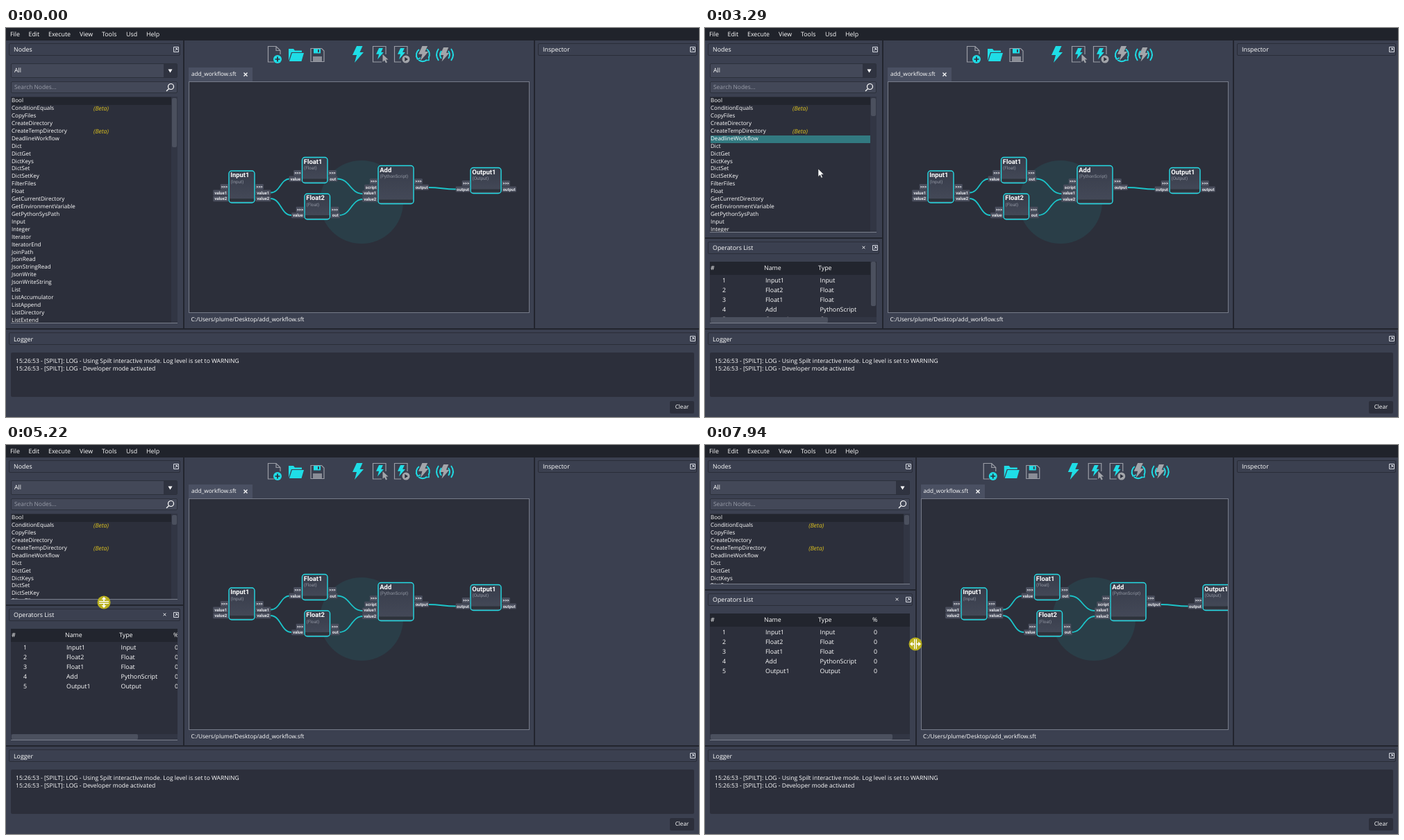
Animation, 998 px wide and 561 px high, one loop 8 s. Source, as an HTML page:

```html
<!DOCTYPE html>
<html lang="en">
<head>
<meta charset="utf-8">
<title>Node editor</title>
<style>
/* --split: centre of the lower left title; --wide: growth of the left column */
@property --split { syntax: '<number>'; inherits: true; initial-value: 449; }
@property --wide { syntax: '<number>'; inherits: true; initial-value: 0; }

html, body { margin: 0; width: 100%; height: 100%; overflow: hidden; background: #3b4050; }
#stage {
  --d: calc(var(--wide) * 1px);
  --t: calc(var(--split) * 1px);
  position: relative; width: 998px; height: 561px; overflow: hidden;
  background: #3b4050; color: #fff; white-space: pre;
  font: 8.85px 'Open Sans', 'Noto Sans', sans-serif;
  text-rendering: geometricPrecision;
  animation: split 8s step-end infinite, widen 8s step-end infinite;
}
#stage div, #stage span, #stage svg { position: absolute; box-sizing: border-box; }
svg { overflow: visible; }

.line { background: #22252e; }
.dark { background: #2c2f3b; }
.title { height: 18px; line-height: 17px; padding-left: 6px; border: 1px solid #2a2d38; border-radius: 2px; }
.title svg { right: 1px; top: 4px; }
.field { left: 7px; right: 8px; background: #434858; border: 1px solid #2c303b; border-radius: 2px; padding-left: 4px; }
.well { background: #2c2f3b; border-radius: 2px; }
.thumb { background: #4b505e; border-radius: 2px; }

#menu { left: 0; top: 0; width: 998px; height: 18px; background: #20232b; line-height: 18px; }
#toolsHi { left: 132px; top: 0; width: 34px; height: 17px; background: #37808a; border-radius: 2px; animation: toolsHi 8s step-end infinite; }
#drop { left: 132px; top: 18px; width: 77px; height: 20px; background: #2c2f3b; border: 1px solid #4b505e; animation: drop 8s step-end infinite; }
#drop span { inset: 0; padding-left: 9px; line-height: 18px; animation: dropHi 8s step-end infinite; }

#left { left: 0; top: 18px; width: calc(255px + var(--d)); height: 415px; overflow: hidden; }
#left > div { margin-top: -18px; }
#list { left: 7px; right: 8px; top: 99px; height: calc(var(--t) - 122.5px); overflow: hidden; border-bottom: 1px solid #7a7f8c; font-size: 8.05px; line-height: 10.91px; }
#list .row { left: 1px; right: 9px; height: 10.91px; }
#list .row i { position: absolute; left: calc(118px + var(--d) * .49); color: #dcc11f; font-size: 8.6px; }
#list .thumb { --h: calc(var(--split) - 122); right: 1px; width: 7px; top: 2px; height: calc(max(14, var(--h) * var(--h) / 1506) * 1px); }
#hover { background: #327980; animation: hover 8s step-end infinite; }

#table {
  --v: clamp(0, var(--split) - 309, 1);
  --vw: calc(240 + var(--wide) - 9 * var(--v));
  left: 7px; right: 8px; top: calc(var(--t) + 19px); height: calc(407px - var(--t)); overflow: hidden;
  border-bottom: 1px solid #7a7f8c;
}
#cells { left: 0; top: 0; height: 100%; width: calc(var(--vw) * 1px); overflow: hidden; }
#cells .head { left: 0; right: 0; top: 0; height: 19px; background: #22252e; line-height: 19px; }
#cells .row { left: 0; top: 0; line-height: 14px; }
#hbar { left: 1px; bottom: 0; height: 8px; width: calc(var(--vw) * var(--vw) / 316 * 1px); }
#vbar { right: 1px; top: 0; width: calc(7px * var(--v)); height: calc(700px - 2 * var(--t)); }

#canvas { left: calc(263px + var(--d)); top: 77px; width: calc(491px - var(--d)); height: 334px; overflow: hidden; background: #2c2f3a; border: 1px solid #767b89; }
#graph { left: -264px; top: -78px; font-family: Roboto, sans-serif; }
#tools { left: 0; top: 0; transform: translateX(calc(var(--d) * .5)); }

#mouse { left: 0; top: 0; animation: move 8s step-end infinite; }
#arrow { animation: arrow 8s step-end infinite; }
#grip { animation: grip 8s step-end infinite; }
#press { animation: press 8s step-end infinite; }

@keyframes split {
  0% { --split: 449; }
  35.3% { --split: 318; }
  61.8% { --split: 300; animation-timing-function: steps(4); }
  65.1% { --split: 246; animation-timing-function: steps(6); }
  70%, 100% { --split: 224; }
}
@keyframes widen {
  0% { --wide: 0; }
  93.3% { --wide: 3; animation-timing-function: steps(6); }
  99.1%, 100% { --wide: 47.5; }
}
@keyframes toolsHi { 0% { opacity: 0; } 15.8% { opacity: 1; } 34.4%, 100% { opacity: 0; } }
@keyframes drop { 0% { opacity: 0; } 18.4% { opacity: 1; } 34.4%, 100% { opacity: 0; } }
@keyframes dropHi { 0% { background: #2c2f3b; } 21.1%, 100% { background: #37808a; } }
@keyframes hover {
  0% { opacity: 0; top: 12.2px; }
  40.3% { opacity: 1; top: 12.2px; }
  41% { opacity: 1; top: 55.9px; }
  41.9% { opacity: 1; top: 110.4px; }
  42.7% { opacity: 1; top: 154.1px; }
  43.5% { opacity: 1; top: 175.9px; }
  44.3% { opacity: 1; top: 186.8px; }
  47.8%, 100% { opacity: 0; top: 186.8px; }
}
@keyframes move {
  0% { transform: translate(925px, 539px); }
  5.7% { transform: translate(925px, 539px); animation-timing-function: steps(5); }
  9.7% { transform: translate(470px, 200px); animation-timing-function: steps(6); }
  14.9% { transform: translate(165px, 20px); }
  15.8% { transform: translate(159px, 16px); }
  16.6% { transform: translate(155px, 13px); }
  19.5% { transform: translate(155px, 13px); animation-timing-function: steps(3); }
  21.9% { transform: translate(168px, 29px); }
  26.2% { transform: translate(180px, 28px); animation-timing-function: steps(2); }
  27.8% { transform: translate(203px, 27px); }
  39.4% { transform: translate(192px, 62px); animation-timing-function: steps(2); }
  41% { transform: translate(163px, 203px); animation-timing-function: steps(4); }
  44.3% { transform: translate(142px, 290px); }
  46% { transform: translate(142px, 291px); animation-timing-function: steps(5); }
  51% { transform: translate(138px, 300px); }
  54.4% { transform: translate(138px, 302px); }
  61.8% { transform: translate(138px, 284px); animation-timing-function: steps(4); }
  65.1% { transform: translate(141px, 227px); animation-timing-function: steps(6); }
  70% { transform: translate(141px, 207px); }
  70.9% { transform: translate(160px, 215px); animation-timing-function: steps(3); }
  73.3% { transform: translate(261px, 264px); }
  76.5% { transform: translate(260px, 272px); animation-timing-function: steps(4); }
  80.6% { transform: translate(254px, 286px); }
  90.8% { transform: translate(255px, 287px); }
  93.3% { transform: translate(258px, 287px); animation-timing-function: steps(6); }
  99.1%, 100% { transform: translate(303px, 287px); }
}
@keyframes arrow { 0% { opacity: 0; } 5.7% { opacity: 1; } 54.4% { opacity: 0; } 70.9% { opacity: 1; } 90.8%, 100% { opacity: 0; } }
@keyframes grip {
  0% { opacity: 0; transform: none; }
  54.4% { opacity: 1; transform: none; }
  70.9% { opacity: 0; transform: rotate(90deg); }
  90.8%, 100% { opacity: 1; transform: rotate(90deg); }
}
@keyframes press {
  0% { opacity: 0; } 17.5% { opacity: 1; } 19.5% { opacity: 0; }
  34.4% { opacity: 1; } 35.3% { opacity: 0; } 56% { opacity: 1; }
  70.9% { opacity: 0; } 90.8%, 100% { opacity: 1; }
}
</style>
</head>
<body>
<div id="stage">
  <div id="left">
    <div class="title" style="left:4px;right:4px;top:22px">Nodes<svg width="8" height="8"><use href="#pop"/></svg></div>
    <div class="field" style="top:51px;height:21px;line-height:19px">All<div style="right:0;top:0;width:19px;height:19px;background:#2f3340"><svg width="19" height="19"><path d="M6.5 7.5h6l-3 5z" fill="#fff"/></svg></div></div>
    <div class="field" style="top:77px;height:17px;line-height:15px;color:#9a9eaa;font-size:8.4px">Search Nodes...<svg style="right:3px;top:1px" width="13" height="13" fill="none" stroke="#fff" stroke-width="1.2"><circle cx="7.5" cy="5.5" r="4"/><path d="M4.6 8.5L1 12"/></svg></div>
    <div id="list" class="dark"><div style="right:0;top:0;width:9px;height:100%;background:#323644"></div><div class="thumb"></div></div>
    <div class="line" style="left:0;right:0;top:calc(var(--t) - 16px);height:2px"></div>
    <div class="title" style="left:4px;right:4px;top:calc(var(--t) - 10px)">Operators List<svg width="8" height="8"><use href="#pop"/></svg><svg style="right:19px;top:5px" width="5" height="5"><path d="M.7.7l3.6 3.6M4.3.7L.7 4.3" stroke="#fff"/></svg></div>
    <div id="table" class="dark">
      <div id="cells"></div>
      <div id="vbar" class="thumb"></div>
      <div style="left:0;right:0;bottom:0;height:8px;background:#323644"></div>
      <div id="hbar" class="thumb"></div>
    </div>
  </div>
  <div class="line" style="left:calc(255px + var(--d));top:18px;width:2px;height:415px"></div>

  <svg id="tools" width="998" height="60">
    <defs>
      <path id="bolt" d="M6 0H14.5L10.5 9H16L3 24L6 13H0Z"/>
      <g id="pop" fill="none" stroke="#d5d8e0"><path d="M.5.5h7v7h-7z"/><path d="M2.3 5.7L5.5 2.5M3 2.5h2.5V5"/></g>
    </defs>
    <g fill="none" stroke="#9a9da6" stroke-width="1.2">
      <path d="M386 49H377.500V26.500H389L395 32.500V38M389 26.500V32.500H395"/>
      <path d="M439 29.500H454.500L458 33V48.500H439Z"/>
      <path d="M541 49H528.500V26.500H547V38M569 49H559.500V26.500H578V38"/>
    </g>
    <path d="M442 41H455V48H442Z" fill="#8a8d96"/>
    <g fill="#1fdde6">
      <circle cx="391" cy="45" r="6"/>
      <path d="M407 47V30H414L416 32.500H426V35H411Z"/>
      <path d="M408 48L412 36H429L425.500 48Z"/>
      <path d="M443 30H453V36.500H443Z"/>
      <use href="#bolt" x="499" y="26"/>
      <use href="#bolt" transform="translate(533 29) scale(.68)"/>
      <use href="#bolt" transform="translate(564 29) scale(.68)"/>
    </g>
    <path d="M391 41.500V48.500M387.500 45H394.500" stroke="#2c2f3b" stroke-width="1.700"/>
    <path d="M450 31V35" stroke="#3b4050" stroke-width="2"/>
    <g fill="#a3a5aa">
      <path d="M542.500 38V49L545 46.500L547 50.500L549 49.500L547 45.500H550.500Z"/>
      <circle cx="576" cy="45" r="5.500"/>
      <use href="#bolt" transform="translate(594 26) scale(.9)"/>
      <use href="#bolt" transform="translate(625 28) scale(.85)"/>
    </g>
    <path d="M574.300 42L579 45L574.300 48Z" fill="#2c2f3b"/>
    <g fill="none" stroke="#1fdde6" stroke-width="2">
      <path d="M592.500 44A9.500 9.500 0 0 1 595 31M606 30.500A9.500 9.500 0 0 1 608.500 43M606 46A9.500 9.500 0 0 1 594 46"/>
      <path d="M590.500 40L592.500 45L597 43M604 46.500H609V41.500" stroke-width="1.500"/>
      <path d="M627 33Q623 38.500 627 44M623 30Q617 38.500 623 47M637 33Q641 38.500 637 44M641 30Q647 38.500 641 47" stroke-width="1.800"/>
    </g>
  </svg>

  <div style="left:calc(263px + var(--d));top:57px;width:92px;height:20px;background:#4a5062;line-height:20px;padding-left:4px;font-size:8.2px">add_workflow.sft<svg style="left:79px;top:7px" width="6" height="6"><path d="M.5.5l5 5M5.5.5l-5 5" stroke="#fff" stroke-width="1.3"/></svg></div>
  <div id="canvas"><svg id="graph" width="998" height="561">
    <linearGradient id="body" x2="0" y2="1"><stop stop-color="#373c4a"/><stop offset="1" stop-color="#454a59"/></linearGradient>
    <circle cx="512" cy="251" r="60" fill="#2a3e48"/>
  </svg></div>
  <div style="left:calc(266.5px + var(--d));top:414px;line-height:14px;font-size:8.25px">C:/Users/plume/Desktop/add_workflow.sft</div>

  <div class="line" style="left:760px;top:18px;width:2px;height:415px"></div>
  <div class="title" style="left:766px;top:22px;width:229px">Inspector<svg width="8" height="8"><use href="#pop"/></svg></div>
  <div class="line" style="left:0;top:433px;width:998px;height:2px"></div>
  <div class="title" style="left:4px;top:439px;width:991px;line-height:18px">Logger<svg width="8" height="8"><use href="#pop"/></svg></div>
  <div class="well" style="left:7px;top:468px;width:984px;height:64px;padding:7px;line-height:11px;font-size:8.55px">15:26:53 - [SPILT]: LOG - Using Spilt interactive mode. Log level is set to WARNING
15:26:53 - [SPILT]: LOG - Developer mode activated</div>
  <div class="well" style="left:956px;top:538px;width:35px;height:18px;line-height:18px;text-align:center;font-size:8.2px">Clear</div>

  <div id="menu"><div id="toolsHi"></div></div>
  <div id="drop"><span>Operators List</span></div>

  <svg id="mouse" width="1" height="1">
    <circle id="press" r="9.5" fill="#b9b01f"/>
    <path id="arrow" d="M0 0V11.5L2.7 9L4.5 13.2L6.4 12.4L4.6 8.3H8.2Z" fill="#fff" stroke="#22252e" stroke-width=".6"/>
    <path id="grip" d="M-7-2H7V-.7H-7ZM-7 .7H7V2H-7ZM-.8-2V-4.300H-3.400L0-8L3.400-4.300H.8V-2ZM-.8 2V4.300H-3.400L0 8L3.400 4.300H.8V2Z" fill="#fff"/>
  </svg>
</div>
<script>
const $ = id => document.getElementById(id);
const add = (id, html) => $(id).insertAdjacentHTML('beforeend', html);
const span = (x, text) => `<span style="left:${x}px">${text}</span>`;

[['File', 6], ['Edit', 32.5], ['Execute', 61], ['View', 106], ['Tools', 138], ['Usd', 173], ['Help', 202]]
  .forEach(([text, x]) => add('menu', span(x, text)));

// Node library
const beta = ['ConditionEquals', 'CreateTempDirectory'];
const names = `Bool ConditionEquals CopyFiles CreateDirectory CreateTempDirectory DeadlineWorkflow Dict DictGet
DictKeys DictSet DictSetKey FilterFiles Float GetCurrentDirectory GetEnvironmentVariable GetPythonSysPath Input
Integer Iterator IteratorEnd JoinPath JsonRead JsonStringRead JsonWrite JsonWriteString List ListAccumulator
ListAppend ListDirectory ListExtend`.split(/\s+/);
add('list', '<div id="hover" class="row"></div>');
names.forEach((name, i) => add('list',
  `<div class="row${i ? '' : ' line'}" style="top:${1.3 + i * 10.91}px">${name}${beta.includes(name) ? '<i>(Beta)</i>' : ''}</div>`));

// Operators table
add('cells', `<div class="head">${span(1, '#') + span(78, 'Name') + span(156, 'Type') + span(234, '%')}</div>`);
[['Input1', 'Input'], ['Float2', 'Float'], ['Float1', 'Float'], ['Add', 'PythonScript'], ['Output1', 'Output']]
  .forEach(([name, type], i) => add('cells',
    `<div class="row" style="top:${20 + i * 14}px">${span(18, i + 1) + span(80, name) + span(158.5, type) + span(236, 0)}</div>`));

// Graph
const wire = (x1, y1, x2, y2) => {
  const mid = (x1 + x2) / 2;
  return `<path d="M${x1} ${y1}C${mid} ${y1} ${mid} ${y2} ${x2} ${y2}" fill="none" stroke="#1cc4c9" stroke-width="1.8"/>`;
};
const portWidth = { '>>>': 11.5, value: 18, value1: 22, value2: 22, out: 13, script: 19, output: 20.5 };
const port = (text, x, y, left) => {
  const w = portWidth[text], x0 = left ? x - w : x;
  return `<rect x="${x0}" y="${y - 4}" width="${w}" height="8" rx="1" fill="#4a4e5d"/>
    <text x="${x0 + w / 2}" y="${y + 2}" font-size="6.1" font-weight="700" fill="#e4e6ea" text-anchor="middle">${text}</text>`;
};
const node = (name, type, x, y, w, h, py, ins, outs) => {
  const ports = (list, px, left) => ['>>>', ...list].map((p, i) => port(p, px, py + i * 8.6, left)).join('');
  return `<rect x="${x}" y="${y}" width="${w}" height="${h}" rx="4" fill="url(#body)" stroke="#25dbe4" stroke-width="1.4"/>
    <rect x="${x + 1}" y="${y + h - 6}" width="${w - 2}" height="4" fill="#2d323a"/>
    <text x="${x + 2.3}" y="${y + 9.2}" font-size="9.4" font-weight="700" fill="#fff">${name}</text>
    <text x="${x + 2.5}" y="${y + 17.6}" font-size="6.4" fill="#9196a2">${type}</text>`
    + ports(ins, x - .8, true) + ports(outs, x + w + 1.3, false);
};
add('graph', [[381, 237.5, 409, 217.5], [381, 246, 411, 270], [477, 217.5, 514, 239], [480, 270, 514, 247], [608, 230, 648, 232.5]]
  .map(w => wire(...w)).join(''));
const pair = ['value1', 'value2'];
add('graph', [
  ['Input1', '(Input)', 321, 206, 37, 46, 229, pair, pair],
  ['Float1', '(Float)', 426.5, 186.5, 36.5, 37, 209, ['value'], ['out']],
  ['Float2', '(Float)', 430, 239, 36.5, 37, 261.7, ['value'], ['out']],
  ['Add', '(PythonScript)', 536, 198.5, 51, 55, 221.2, ['script', ...pair], ['output']],
  ['Output1', '(Output)', 669, 201.5, 44, 37, 224, ['output'], ['output']]
].map(n => node(...n)).join(''));
</script>
</body>
</html>
```
